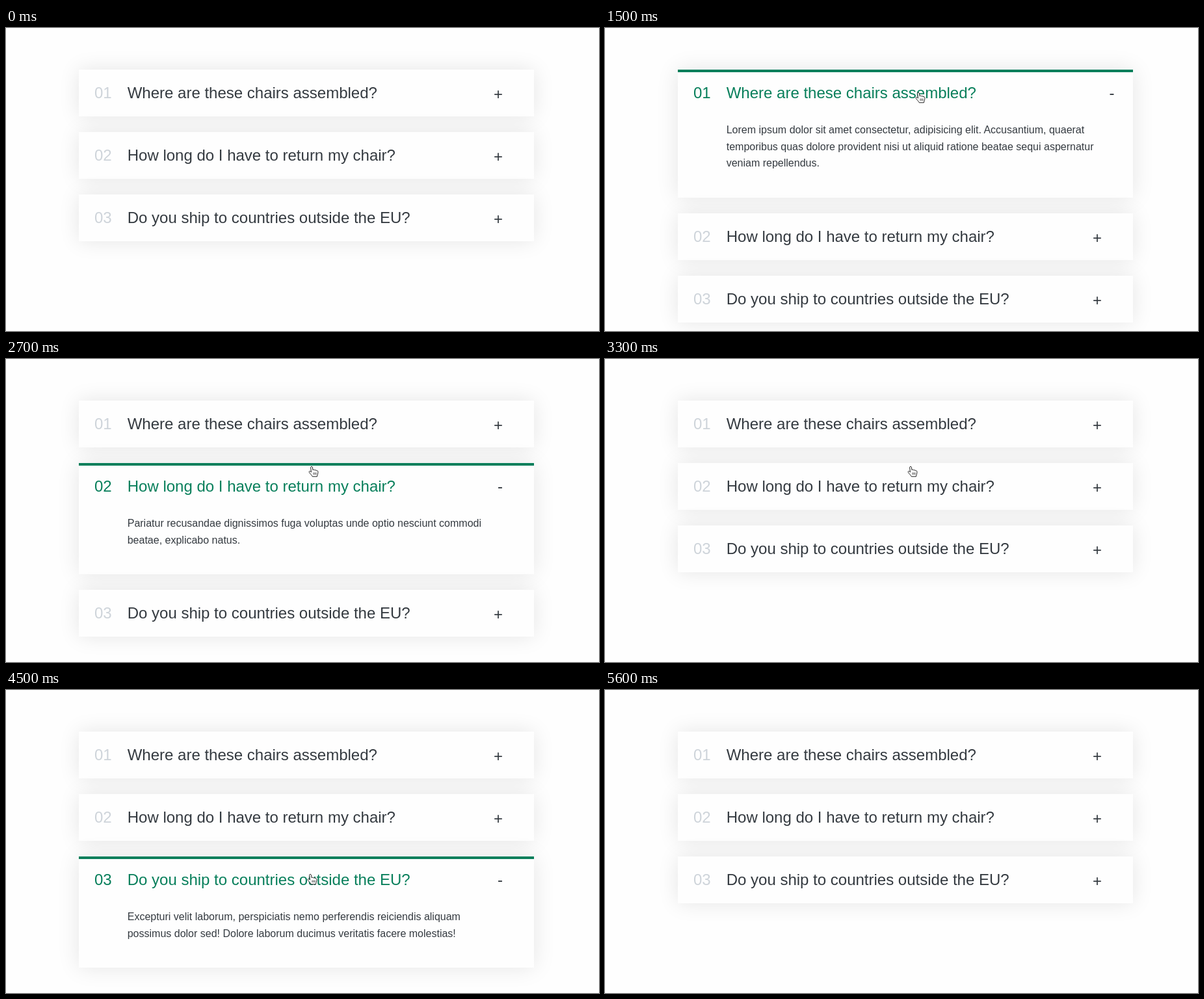
These frames come from a looping animation (912x466 px, 6.2 s). An HTML page:

```html
<!DOCTYPE html>
<html lang="en">
<head>
<meta charset="utf-8">
<title>Chair FAQ accordion</title>
<style>
  html, body { margin: 0; width: 100%; height: 100%; overflow: hidden; background: #fefefe; }
  body { position: relative; font-family: "Liberation Sans", Arial, sans-serif; color: #343a40; }
  .accordion {
    position: absolute; left: 112px; top: 64px; width: 700px;
    display: flex; flex-direction: column; gap: 24px;
  }
  .item {
    display: grid; grid-template-columns: auto 1fr auto; column-gap: 24px; row-gap: 32px;
    padding: 20px 48px 20px 24px;
    border-top: 4px solid #fefefe; border-bottom: 4px solid #fefefe;
    background: #fefefe; box-shadow: 0 0 32px rgba(0, 0, 0, .1);
  }
  .number, .title, .icon { margin: 0; font-size: 24px; font-weight: 400; line-height: 1; }
  .number { color: #ced4da; }
  .icon { position: relative; top: 2px; }
  .icon::before { content: "+"; }
  .answer { display: none; grid-column: 2; margin: 0; padding-bottom: 16px; font-size: 16px; line-height: 1.6; white-space: nowrap; }
  .open { border-top-color: #087f5b; }
  .open .number, .open .title { color: #087f5b; }
  .open .icon { top: 0; }
  .open .icon::before { content: "-"; }
  .open .answer { display: block; }
  #cursor { position: absolute; left: 0; top: 0; width: 1px; height: 1px; overflow: visible; stroke-linejoin: round; }
</style>
</head>
<body>
<main class="accordion">
  <section class="item">
    <p class="number">01</p><h2 class="title">Where are these chairs assembled?</h2><span class="icon"></span>
    <p class="answer">Lorem ipsum dolor sit amet consectetur, adipisicing elit. Accusantium, quaerat<br>temporibus quas dolore provident nisi ut aliquid ratione beatae sequi aspernatur<br>veniam repellendus.</p>
  </section>
  <section class="item">
    <p class="number">02</p><h2 class="title">How long do I have to return my chair?</h2><span class="icon"></span>
    <p class="answer">Pariatur recusandae dignissimos fuga voluptas unde optio nesciunt commodi<br>beatae, explicabo natus.</p>
  </section>
  <section class="item">
    <p class="number">03</p><h2 class="title">Do you ship to countries outside the EU?</h2><span class="icon"></span>
    <p class="answer">Excepturi velit laborum, perspiciatis nemo perferendis reiciendis aliquam<br>possimus dolor sed! Dolore laborum ducimus veritatis facere molestias!</p>
  </section>
</main>
<svg id="cursor">
  <g id="hand" fill="#fff" stroke="#222" stroke-width="1">
    <path d="M-1.4 1.6C-1.4 0 1.3 0 1.4 1.6L2 5.8C2.5 4.9 4.8 5 5 6.3C5.6 5.4 7.5 5.7 7.7 7C8.5 6.5 9.9 6.9 9.9 8.3C10 11.5 8.8 13 8.4 15.8H1.2C.6 13.8-2 12-3.6 9.4C-4.5 7.7-2.9 7-1.7 8L-.6 9Z"/>
    <path d="M3 9.5v3.5M5 9.5v3.5M7 9.5v3.5" stroke-width=".8"/>
  </g>
  <path id="arrow" fill="#000" stroke="#fff" d="M0 0V14L3.2 11L5.4 16L7.8 15L5.6 10.2H10Z"/>
</svg>
<script>
  const LOOP = 6200, STEP = 100;
  const items = [...document.querySelectorAll('.item')];
  const accordion = document.querySelector('.accordion');
  const [cursor, hand, arrow] = ['cursor', 'hand', 'arrow'].map(id => document.getElementById(id));

  // When each item is open, in ms
  const openSpans = [[1500, 2100], [2700, 3300], [4100, 4900]];
  const entry = { x: 500, y: 480 };
  const moves = [
    { start: 1000, end: 1400, x: 482, y: 99 },
    { start: 2300, end: 2500, x: 470, y: 165 },
    { start: 3400, end: 3800, x: 466, y: 281 },
    { start: 4400, end: 4500, x: 468, y: 283 },
    { start: 5000, end: 5400, x: 476, y: 464 }
  ];

  const easeOut = p => 1 - (1 - p) ** 2;
  const show = (el, visible) => { el.style.display = visible ? '' : 'none'; };

  function cursorAt(t) {
    let { x, y } = entry;
    for (const move of moves) {
      if (t < move.start) break;
      const k = easeOut(Math.min(1, (t - move.start + STEP) / (move.end - move.start + STEP)));
      x += (move.x - x) * k;
      y += (move.y - y) * k;
    }
    return { x, y };
  }

  function isOverItem(y) {
    const local = y - accordion.offsetTop;
    return items.some(el => {
      const top = el.getBoundingClientRect().top - accordion.offsetTop;
      return local >= top && local < top + el.offsetHeight;
    });
  }

  function render(time) {
    const t = Math.floor(time % LOOP / STEP) * STEP;
    items.forEach((el, i) => {
      const [from, to] = openSpans[i];
      el.classList.toggle('open', t >= from && t < to);
    });
    const { x, y } = cursorAt(t);
    const over = isOverItem(y);
    show(cursor, t >= 1000 && t < 5600);
    show(hand, over);
    show(arrow, !over);
    cursor.style.transform = `translate(${x}px, ${y}px)`;
  }

  const began = performance.now();
  function tick() {
    render(performance.now() - began);
    requestAnimationFrame(tick);
  }
  tick();
</script>
</body>
</html>
```
